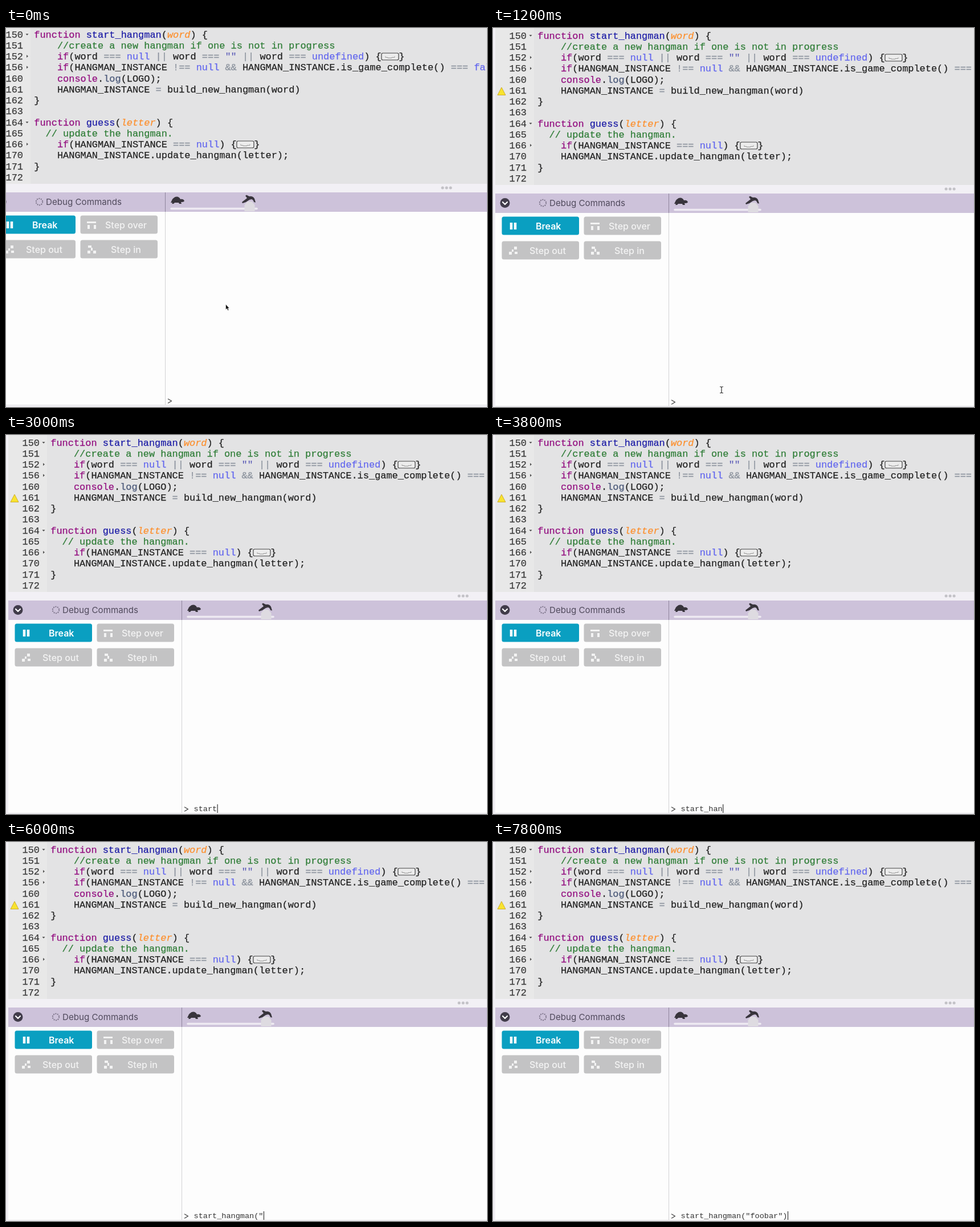
An HTML page for the animation above (8 s loop, 844 by 664 pixels).

```html
<!DOCTYPE html>
<html lang="en">
<head>
<meta charset="utf-8">
<title>Code editor and console</title>
<style>
  html, body { margin: 0; width: 100%; height: 100%; overflow: hidden; background: #fff; }
  svg { display: block; width: 100vw; height: 100vh; }
  text { white-space: pre; }
  .code { font: 16.93px "Liberation Mono", monospace; fill: #222; stroke: #222; stroke-width: .25; }
  .keyword { fill: #930f80; stroke: #930f80; }
  .name { fill: #1c1ca6; stroke: #1c1ca6; }
  .param { fill: #fd8f2c; stroke: #fd8f2c; font-style: italic; }
  .comment { fill: #2f7d37; stroke: #2f7d37; }
  .constant { fill: #6266ee; stroke: #6266ee; }
  .operator { fill: #8b929d; stroke: #8b929d; }
  .string { fill: #5555b5; stroke: none; }
  .support { fill: #4c5a7a; stroke: #4c5a7a; }
  .number { fill: #3a3a3a; stroke: #3a3a3a; }
  .console { font: 13.55px "Liberation Mono", monospace; fill: #333; }
  .label { font: 500 16px Inter, sans-serif; fill: #f3f3f3; }
  .label.on { font-weight: 600; fill: #fff; }
  .title { font: 15.15px Inter, sans-serif; fill: #504a5c; }
  .line { fill: none; stroke-linecap: round; stroke-linejoin: round; }
</style>
</head>
<body>
<svg viewBox="0 0 844 664" preserveAspectRatio="none">
  <rect width="844" height="664" fill="#fff"/>
  <g id="camera">
    <!-- panes -->
    <rect y="-5" width="900" height="675" fill="#f2f0f5"/>
    <rect x="4" y="-5" width="896" height="280" fill="#e3e3e4"/>
    <rect x="4" y="-5" width="68" height="280" fill="#e8e8e8"/>
    <rect x="4" y="290" width="896" height="34" fill="#cdc2da"/>
    <rect x="4" y="324" width="896" height="338" fill="#fdfdfd"/>
    <path d="M4 662.5H900" stroke="#e4e3e6"/>
    <path d="M308.5 290V324" stroke="#8f859d"/>
    <path d="M308.5 324V662" stroke="#d2d2d4"/>
    <path d="M795 282h.1M802 282h.1M809 282h.1" class="line" stroke="#c3c2c7" stroke-width="5"/>

    <g id="editor"></g>
    <path d="M15 104L22 117.500H8Z" fill="#f8e32e" stroke="#cfae32" stroke-linejoin="round"/>

    <!-- panel header -->
    <circle cx="21" cy="306.500" r="8.500" fill="#413c4a"/>
    <path d="M17 305l4 4 4-4" class="line" stroke="#fff" stroke-width="2.200"/>
    <circle cx="87.500" cy="306.500" r="5.700" fill="none" stroke="#7d748a" stroke-width="2" stroke-dasharray="2 1.580"/>
    <text x="99" y="312" class="title">Debug Commands</text>

    <!-- speed slider -->
    <path d="M319 318.500H469" class="line" stroke="#eeeaf2" stroke-width="3.500"/>
    <path d="M447.500 323V312l5-6h8l5 6v11Z" fill="#dedbe1"/>
    <path d="M318 308c2-3 2-6 5-8 4-4 10-3 12 2 3-1 6 0 7 3-1 2-4 2-6 2l1 3h-4l-1-2h-7l-2 2h-3l1-2Z" fill="#38343c"/>
    <path d="M443 307l9-7-3-4 2-1.500 5 2.500q6-1 9 4l2 6.500-3-.5q-1-4-4-5l-4 1-6 4-6 2Z" fill="#38343c"/>

    <!-- debug buttons -->
    <g id="buttons"></g>
    <path d="M32 341v12M39 341v12" stroke="#fff" stroke-width="4.500"/>
    <g fill="#f3f3f3">
      <path d="M171 341h16v3h-16ZM172 347h4v7h-4ZM183 347h4v7h-4Z"/>
      <path d="M28 392h5v5h-5ZM33 388h3v4h-3ZM37 383h5v5h-5ZM38 392h5v4h-5Z"/>
      <path d="M173 383h6v4h-6ZM178 387h3v5h-3ZM182 392h5v5h-5ZM172 392h5v5h-5Z"/>
    </g>

    <!-- console -->
    <path d="M313.500 652l6 3.500-6 3.500" class="line" stroke="#444" stroke-width="1.400"/>
    <text id="typed" class="console" x="329.500" y="659"></text>
    <path id="caret" d="M0 647v15" stroke="#333" stroke-width="1.200"/>
  </g>
  <path id="arrow" d="M0 0V9.500L2.200 7.600 3.700 11 5.400 10.300 4 7H6.600Z" fill="#111" stroke="#fff" stroke-width=".6"/>
  <path id="beam" d="M-2.500-5.500Q0-5.500 0-4Q0-5.500 2.500-5.500M0-4.500V4.500M-2.500 5.500Q0 5.500 0 4Q0 5.500 2.500 5.500" class="line" stroke="#333" stroke-width="1.200"/>
</svg>
<script>
const $ = id => document.getElementById(id);
const svgNS = "http://www.w3.org/2000/svg";

function add(parent, tag, attrs, text = "") {
  const node = document.createElementNS(svgNS, tag);
  for (const key in attrs) node.setAttribute(key, attrs[key]);
  node.textContent = text;
  return parent.appendChild(node);
}

// Line number, code, fold marker ("v" open, ">" closed)
const source = [
  [150, "function start_hangman(word) {", "v"],
  [151, "    //create a new hangman if one is not in progress"],
  [152, "    if(word === null || word === \"\" || word === undefined) {   }", ">"],
  [156, "    if(HANGMAN_INSTANCE !== null && HANGMAN_INSTANCE.is_game_complete() === false) {   }", ">"],
  [160, "    console.log(LOGO);"],
  [161, "    HANGMAN_INSTANCE = build_new_hangman(word)"],
  [162, "}"],
  [163, ""],
  [164, "function guess(letter) {", "v"],
  [165, "  // update the hangman."],
  [166, "    if(HANGMAN_INSTANCE === null) {   }", ">"],
  [170, "    HANGMAN_INSTANCE.update_hangman(letter);"],
  [171, "}"],
  [172, ""]
];
const charWidth = 10.16, codeX = 78.3, rowHeight = 19.25;
const tokens = new RegExp([
  "(?<comment>//.*)",
  "(?<name>(?<=function )\\w+)",
  "(?<param>(?<=function \\w+\\()\\w+)",
  "(?<keyword>\\b(?:function|if|console)\\b)",
  "(?<constant>\\b(?:null|undefined|false)\\b)",
  "(?<operator>[!=]==|=|&&|\\|\\|)",
  "(?<string>\"\")",
  "(?<support>(?<=\\.)log)",
  "(?<plain>.)"
].join("|"), "g");

source.forEach(([number, code, fold], row) => {
  const y = 13 + row * rowHeight;
  add($("editor"), "text", { x: 28.5, y: y + 5.5, class: "code number" }, number);
  const line = add($("editor"), "text", { x: codeX, y: y + 5.5, class: "code" });
  for (const match of code.matchAll(tokens)) {
    const type = Object.keys(match.groups).find(key => match.groups[key]);
    if (type === "plain") line.append(match[0]);
    else add(line, "tspan", { class: type }, match[0]);
  }
  if (fold) {
    const shape = fold === "v" ? `M63.5 ${y - 1}h5l-2.5 3Z` : `M65 ${y - 2.5}v5l3-2.5Z`;
    add($("editor"), "path", { d: shape, fill: "#555" });
  }
  const gap = code.indexOf("{   }");
  if (gap >= 0) {
    const x = codeX + (gap + 1) * charWidth;
    add($("editor"), "rect", { x, y: y - 5.5, width: 30, height: 12, rx: 2.5, fill: "#ececec", stroke: "#444", "stroke-width": 1.2 });
    add($("editor"), "path", { d: `M${x + 7} ${y}v2h4v1h7v-1h5v-2`, fill: "none", stroke: "#999" });
  }
});

[
  ["Break", 15.5, 330.5, 75, true],
  ["Step over", 159.5, 330.5, 203],
  ["Step out", 15.5, 373.5, 64],
  ["Step in", 159.5, 373.5, 213]
].forEach(([label, x, y, textX, on]) => {
  add($("buttons"), "rect", { x, y, width: 135.5, height: 32, rx: 3.5, fill: on ? "#0a9fc1" : "#c3c3c4" });
  add($("buttons"), "text", { x: textX, y: y + 22, class: on ? "label on" : "label" }, label);
});

const loop = 8000, tick = 200;
const command = 'start_hangman("foobar")';
// Each run types one character per tick: [start, characters before it, run length]
const runs = [[2200, 0, 13], [5000, 13, 1], [5600, 14, 1], [6200, 15, 8]];
// [time, x, y]
const cameraPath = [[0, -29, -2], [200, -6, -.5], [400, 0, 0]];
const pointerPath = [[0, 385.5, 484], [400, 385.5, 491], [600, 389, 525], [800, 395, 585], [1000, 400, 627], [1200, 401, 634]];

function along(path, time) {
  const next = path.findIndex(point => point[0] > time);
  if (next < 0) return path.at(-1).slice(1);
  const [t0, x0, y0] = path[next - 1], [t1, x1, y1] = path[next];
  const k = (time - t0) / (t1 - t0);
  return [x0 + (x1 - x0) * k, y0 + (y1 - y0) * k];
}

function typedCount(time) {
  const run = runs.findLast(([start]) => time >= start);
  if (!run) return 0;
  const [start, before, length] = run;
  return before + Math.min(length, Math.floor((time - start) / tick) + 1);
}

const place = (node, [x, y]) => node.setAttribute("transform", `translate(${x} ${y})`);
const show = (node, visible) => node.style.display = visible ? "" : "none";

function draw(now) {
  const time = Math.floor(now % loop / tick) * tick;
  const pointer = along(pointerPath, time);
  const count = typedCount(time);
  place($("camera"), along(cameraPath, time));
  place($("arrow"), pointer);
  place($("beam"), pointer);
  show($("arrow"), time < 1000);
  show($("beam"), time >= 1000 && count === 0);
  $("typed").textContent = command.slice(0, count);
  place($("caret"), [330.5 + count * 8.13, 0]);
  show($("caret"), time >= 1800);
}

function frame() {
  draw(performance.now());
  requestAnimationFrame(frame);
}
frame();
</script>
</body>
</html>
```
